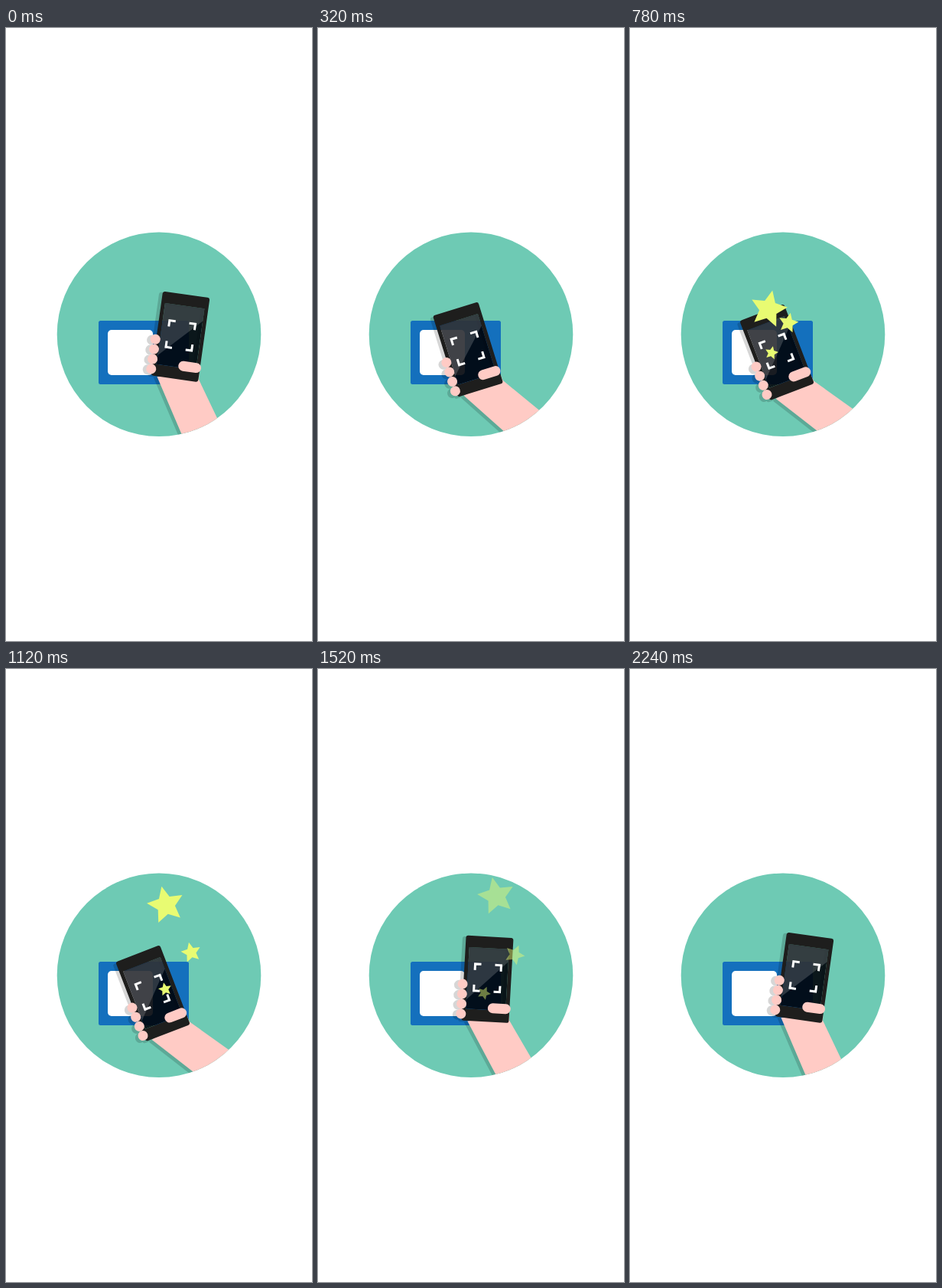
An HTML page that plays this animation: 400 px wide and 800 px high, repeating every 2400 ms.

```html
<!DOCTYPE html>
<html lang="en">
<head>
<meta charset="utf-8">
<title>Phone scan</title>
<style>
  html, body { margin: 0; width: 100%; height: 100%; overflow: hidden; background: #fff; }
  svg { display: block; width: 100%; height: 100%; }
</style>
</head>
<body>
<svg viewBox="0 0 400 800">
  <defs>
    <clipPath id="disc"><circle cx="200" cy="399.8" r="133.3"/></clipPath>
    <!-- hand parts are placed around the centre of the upright phone -->
    <path id="arm" d="M-23 56L31 45L31.5 52L103 160L52 180Z"/>
    <path id="body" fill-rule="evenodd" d="M-28-55.5H28a3 3 0 0 1 3 3V52.5a3 3 0 0 1-3 3H-28a3 3 0 0 1-3-3V-52.5a3 3 0 0 1 3-3ZM-26-40.5V40H26V-40.5Z"/>
    <g id="fingers">
      <circle cx="-32" cy="8" r="6.5"/>
      <circle cx="-32" cy="21" r="6.5"/>
      <circle cx="-32" cy="34" r="6.5"/>
      <circle cx="-32" cy="47" r="6.5"/>
    </g>
  </defs>

  <circle cx="200" cy="399.8" r="133.3" fill="#6ecab4"/>
  <rect x="121" y="382" width="118" height="83" rx="2.5" fill="#1470bd"/>
  <rect x="133" y="394" width="59" height="59" rx="5" fill="#fff"/>

  <g clip-path="url(#disc)">
    <g id="hand">
      <g transform="translate(-4.5 1.5)" opacity=".16">
        <use href="#arm"/><use href="#body"/><use href="#fingers"/>
      </g>
      <use href="#arm" fill="#ffcbc5"/>
      <rect x="-26" y="-40.5" width="52" height="80.5" fill="#00040a" fill-opacity=".9"/>
      <path d="M-26-40.5H26V-24L-26 28Z" fill="#fff" fill-opacity=".17"/>
      <use href="#body" fill="#1e1e1d"/>
      <path d="M-17-11V-19H-9M9-19H17V-11M17 8V16H9M-9 16H-17V8" fill="none" stroke="#fff" stroke-width="3"/>
      <use href="#fingers" fill="#ffcbc5"/>
      <rect x="2.5" y="31" width="30" height="13" rx="6.5" fill="#ffcbc5"/>
    </g>
  </g>
  <g id="stars" fill="#e8fb72"></g>
</svg>
<script>
  const LOOP = 2400, STEP = 20;
  const TILT = { rest: 8, scan: -21, out: 100, back: 1325, span: 750 };
  const TIMES = [640, 780, 1120, 1520, 1700];
  const STARS = [
    { r: 25, x: [173, 181, 209, 233, 234], y: [395, 367, 308, 296.5, 296.5], spin: [24, 12, -13, -12, -12] },
    { r: 13.5, x: [192, 207, 242, 257, 258], y: [394, 385, 370, 373, 373.5], spin: [24, 12, -13, -48, -54] },
    { r: 9, x: [176, 185, 208, 217, 218], y: [427, 424, 418, 423, 423.5], spin: [24, 12, -13, -48, -54] }
  ];

  const clamp = v => Math.min(1, Math.max(0, v));
  const easeOut = p => p <= 0 ? 0 : p >= 1 ? 1 : 1 - 2 ** (-10 * p);
  const mix = (a, b, p) => a + (b - a) * p;

  // Smooth curve through the values at TIMES, coming to rest at the end
  function follow(vals, t) {
    const last = TIMES.length - 1;
    if (t <= TIMES[0]) return vals[0];
    if (t >= TIMES[last]) return vals[last];
    const slope = i => (vals[i + 1] - vals[i]) / (TIMES[i + 1] - TIMES[i]);
    const tangent = i => i === 0 ? slope(0) : i === last ? 0 : (slope(i - 1) + slope(i)) / 2;
    const i = TIMES.findIndex(k => k > t) - 1;
    const d = TIMES[i + 1] - TIMES[i], u = (t - TIMES[i]) / d, v = 1 - u;
    return v * v * (1 + 2 * u) * vals[i] + u * u * (1 + 2 * v) * vals[i + 1]
      + d * u * v * (v * tangent(i) - u * tangent(i + 1));
  }

  function starPoints(r) {
    return Array.from({ length: 10 }, (_, i) => {
      const a = i * Math.PI / 5, q = i % 2 ? r * 0.48 : r;
      return (q * Math.sin(a)).toFixed(2) + ',' + (-q * Math.cos(a)).toFixed(2);
    }).join(' ');
  }

  const hand = document.getElementById('hand');
  const group = document.getElementById('stars');
  for (const s of STARS) {
    s.el = document.createElementNS('http://www.w3.org/2000/svg', 'polygon');
    s.el.setAttribute('points', starPoints(s.r));
    group.append(s.el);
  }

  function draw(t) {
    const go = easeOut((t - TILT.out) / TILT.span) - easeOut((t - TILT.back) / TILT.span);
    const tilt = mix(TILT.rest, TILT.scan, go);
    const pivot = mix(248.8, 250, go);
    hand.setAttribute('transform', `translate(${pivot} 485) rotate(${tilt}) translate(-32 -78.5)`);

    const size = clamp((t - 640) / 120);
    group.setAttribute('opacity', size ? 1 - clamp((t - 1200) / 600) : 0);
    for (const s of STARS) {
      s.el.setAttribute('transform',
        `translate(${follow(s.x, t)} ${follow(s.y, t)}) rotate(${follow(s.spin, t)}) scale(${size})`);
    }
  }

  const start = performance.now();
  function tick() {
    const t = (performance.now() - start) % LOOP;
    draw(Math.floor(t / STEP) * STEP);
    requestAnimationFrame(tick);
  }
  tick();
</script>
</body>
</html>
```
